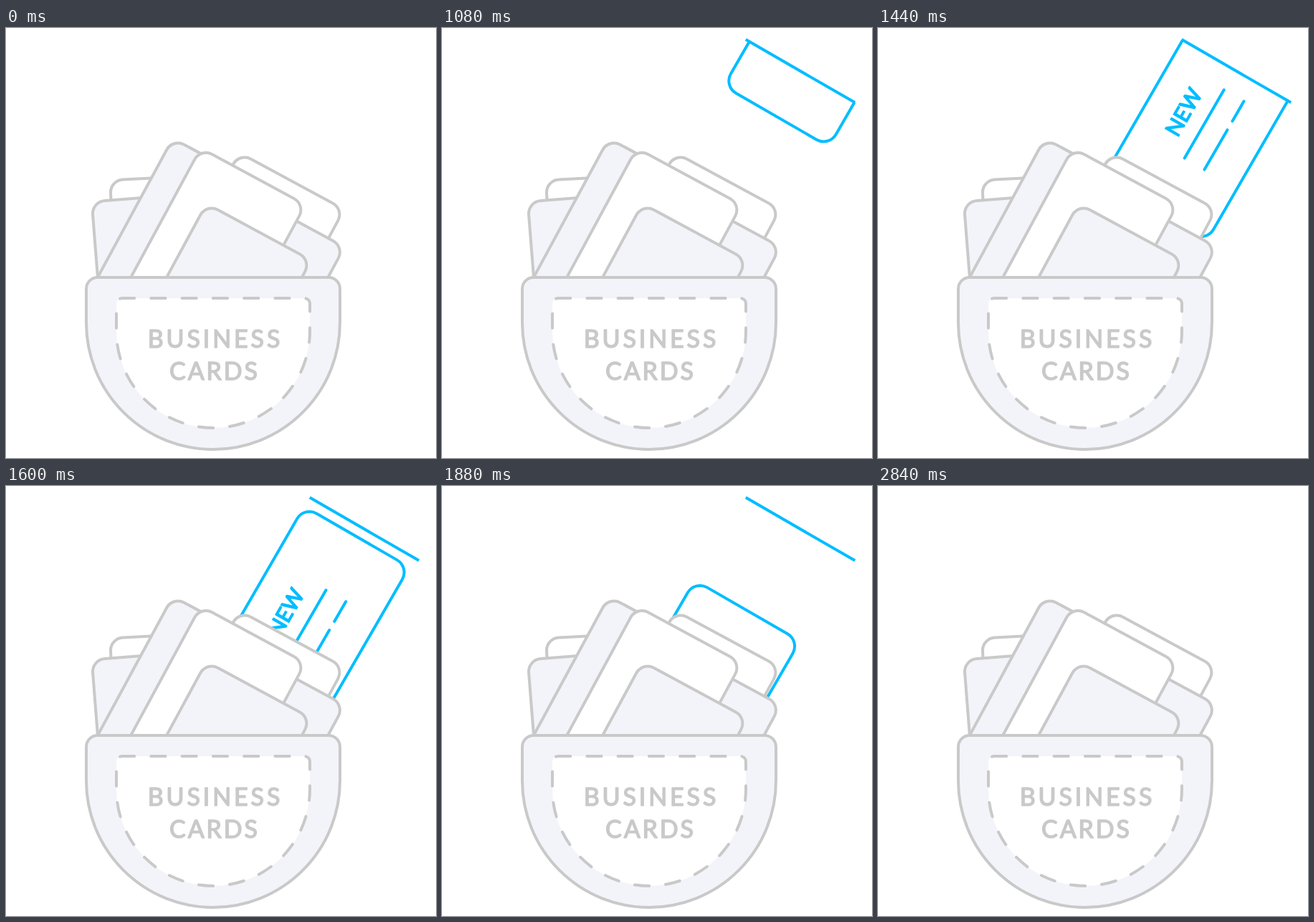
An HTML page for the animation above (3.68 s loop, 600 by 600 pixels).

```html
<!DOCTYPE html>
<html lang="en">
<head>
<meta charset="utf-8">
<title>Business cards</title>
<style>
html, body { margin: 0; width: 100%; height: 100%; overflow: hidden; background: #fff; }
svg { display: block; width: 100vw; height: 100vh; }
.gray { stroke: #c9c9c9; stroke-width: 4; stroke-linecap: round; stroke-linejoin: round; }
.white { fill: #fff; }
.tint { fill: #f3f4f9; }
.blue { stroke: #00bdff; stroke-width: 4; fill: none; }
text { font-family: Lato, "Open Sans", sans-serif; stroke-linejoin: round; }
.label { font-size: 34px; text-anchor: middle; fill: #c9c9c9; stroke: #c9c9c9; stroke-width: 1.5; }
.new { font-size: 30px; text-anchor: middle; fill: #00bdff; stroke: #00bdff; stroke-width: 1.6; }
</style>
</head>
<body>
<svg viewBox="0 0 600 600">
  <defs>
    <clipPath id="above"><rect width="600" height="348"/></clipPath>
    <clipPath id="slot"><rect x="-130" width="260" height="520"/></clipPath>
  </defs>
  <g clip-path="url(#above)">
    <g id="left" class="gray"></g>
    <g transform="translate(500 60.1) rotate(30)" clip-path="url(#slot)">
      <g id="card" class="blue">
        <rect x="-84.7" width="169.4" height="282" rx="20" fill="#fff"/>
        <path d="M0 86V196M32 86V118M32 132V196" stroke-linecap="round"/>
        <text class="new" transform="translate(-22.5 141) rotate(-90)">NEW</text>
      </g>
    </g>
    <g id="front" class="gray"></g>
  </g>
  <path class="gray tint" d="M112 364a16 16 0 0 1 16-16H450a16 16 0 0 1 16 16V411a177 177 0 0 1-354 0Z"/>
  <path class="gray white" pathLength="18" stroke-dasharray=".47 .53" stroke-dashoffset=".07"
    d="M162 377H416a8 8 0 0 1 8 8V423a135 135 0 0 1-270 0V385a8 8 0 0 1 8-8Z"/>
  <text class="label" x="292" y="446" letter-spacing="3.9">BUSINESS</text>
  <text class="label" x="291" y="491" letter-spacing="2.9">CARDS</text>
  <line id="bar" class="blue" transform="translate(500 60.1) rotate(30)"/>
</svg>
<script>
const $ = id => document.getElementById(id);
const LOOP = 3680, STEP = 40, R = 18;
const clamp = v => Math.max(0, Math.min(1, v));

// x, y: centre of the rounded top-left corner
function addCard(parent, x, y, angle, fill) {
  const r = document.createElementNS('http://www.w3.org/2000/svg', 'rect');
  const attrs = { x: -R, y: -R, width: 130 + 2 * R, height: 300, rx: R, class: fill,
    transform: `translate(${x} ${y}) rotate(${angle})` };
  for (const k in attrs) r.setAttribute(k, attrs[k]);
  parent.append(r);
}

addCard($('left'), 164, 229.5, -3, 'white');
addCard($('left'), 139, 259, -4.5, 'tint');
addCard($('front'), 333, 198.5, 28.4, 'white');
addCard($('front'), 333.5, 251, 28.4, 'tint');
addCard($('front'), 240, 178.5, 28.4, 'tint');
addCard($('front'), 279, 192, 28.4, 'white');
addCard($('front'), 287, 269.5, 28.4, 'tint');

function draw(time) {
  const n = Math.floor((time % LOOP) / STEP);

  // bar grows from its centre, later shrinks back
  const half = 88 * Math.min(clamp(n / 16), clamp((71 - n) / 14));
  $('bar').setAttribute('x1', -half);
  $('bar').setAttribute('x2', half);
  $('bar').style.display = half > 0 ? '' : 'none';

  // card slides out of the bar and into the pocket
  const m = n - 22;
  $('card').style.display = m > 0 && m < 30 ? '' : 'none';
  $('card').setAttribute('transform', `translate(${4.9 - 0.48 * m} ${-296.9 + 17.3 * m})`);
}

let start;
function tick(now) {
  if (start === undefined) start = now;
  draw(now - start);
  requestAnimationFrame(tick);
}
draw(0);
requestAnimationFrame(tick);
</script>
</body>
</html>
```
